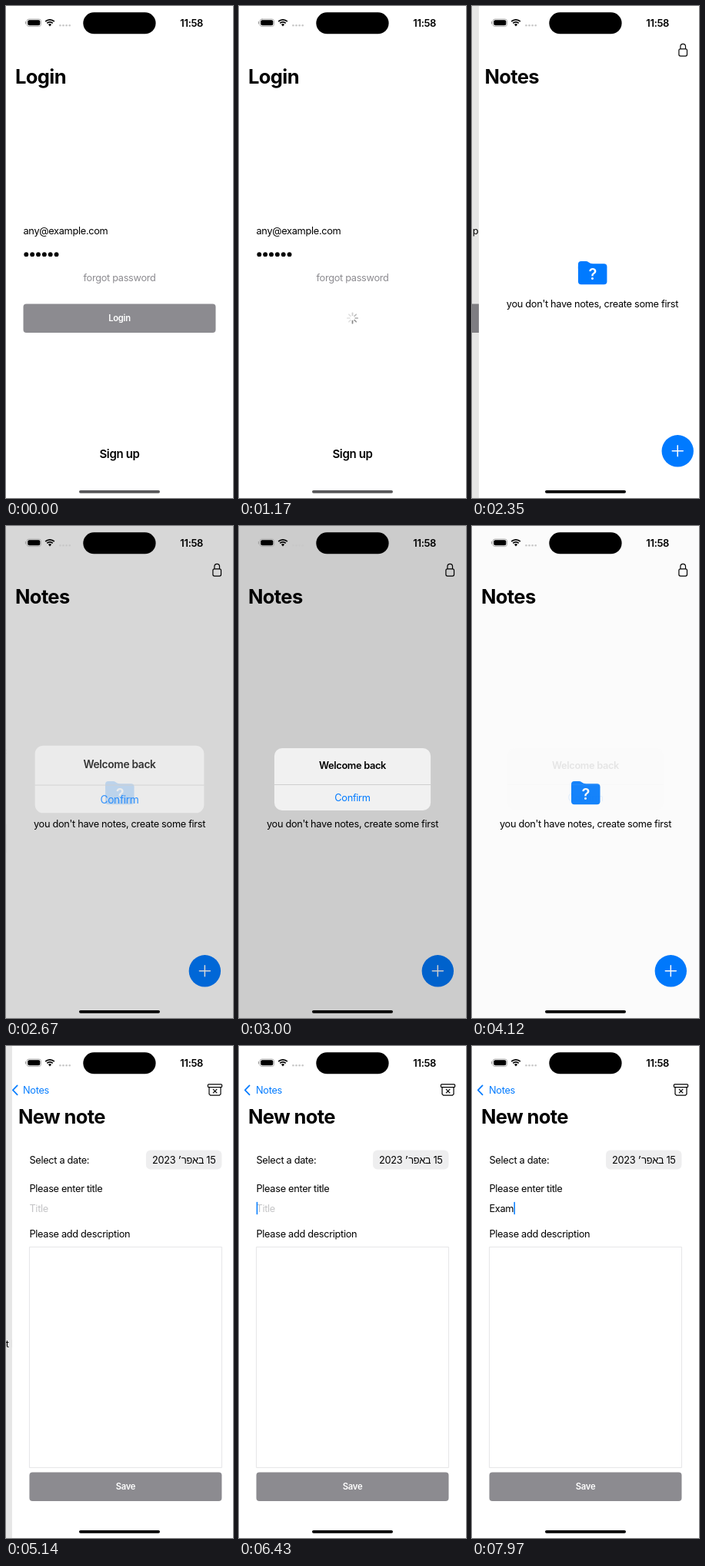
Recreate the animation shown at these times as an HTML page with a canvas. Size 295 px wide and 640 px high, loop 8 s.

```html
<!DOCTYPE html>
<html lang="en">
<head>
<meta charset="utf-8">
<title>Notes app</title>
<style>
html, body { margin: 0; width: 100%; height: 100%; overflow: hidden; background: #fff; }
canvas { display: block; width: 295px; height: 640px; }
</style>
</head>
<body>
<canvas id="stage"></canvas>
<script>
const W = 295, H = 640, LOOP = 8000, MID = 147.5;
const BLUE = '#007aff', GREY = '#8c8b90';
const BODY = 12.76, SMALL = 11.26, LARGE = 25.5;
const EMAIL = 'any@example.com';

// The screen only refreshes at these moments.
const TICKS = [0, 1170, 1280, 1420, 1570, 1670, 1770, 1870,
  2020, 2130, 2240, 2350, 2450, 2560, 2670, 2780, 2890, 3000,
  3760, 3900, 4010, 4120, 4220, 4330, 4690,
  4930, 5040, 5140, 5250, 5360,
  6320, 6430, 6670, 6790, 7330, 7640, 7840, 7970];

const canvas = document.getElementById('stage');
const ctx = canvas.getContext('2d');
const dpr = window.devicePixelRatio || 1;
canvas.width = W * dpr;
canvas.height = H * dpr;

// Critically damped spring: 1 at the start, settling to 0.
function spring(t, start, speed) {
  const u = Math.max(0, t - start) / 1000 * speed;
  return (1 + u) * Math.exp(-u);
}

function group(draw, { x = 0, alpha = 1 } = {}) {
  if (alpha <= 0.002) return;
  ctx.save();
  ctx.translate(x, 0);
  ctx.globalAlpha *= alpha;
  draw();
  ctx.restore();
}

function setFont(size, weight) {
  ctx.font = `${weight} ${size}px Inter, "Liberation Sans", sans-serif`;
  ctx.letterSpacing = `${-0.024 * size}px`;
}

function text(str, x, y, { size = BODY, weight = 400, color = '#000', align = 'left', dir = 'ltr' } = {}) {
  setFont(size, weight);
  ctx.direction = dir;
  ctx.textAlign = align;
  ctx.fillStyle = color;
  ctx.fillText(str, x, y);
}

function box(x, y, w, h, r, color) {
  ctx.fillStyle = color;
  ctx.beginPath();
  ctx.roundRect(x, y, w, h, r);
  ctx.fill();
}

function frame(x, y, w, h, r, color, width) {
  ctx.strokeStyle = color;
  ctx.lineWidth = width;
  ctx.beginPath();
  ctx.roundRect(x, y, w, h, r);
  ctx.stroke();
}

function disc(x, y, r, color) {
  ctx.fillStyle = color;
  ctx.beginPath();
  ctx.arc(x, y, r, 0, Math.PI * 2);
  ctx.fill();
}

function lines(color, width, ...paths) {
  ctx.strokeStyle = color;
  ctx.lineWidth = width;
  ctx.lineCap = ctx.lineJoin = 'round';
  ctx.beginPath();
  for (const [first, ...rest] of paths) {
    ctx.moveTo(...first);
    rest.forEach(p => ctx.lineTo(...p));
  }
  ctx.stroke();
}

function button(label, y) {
  box(22.5, y, 250, 37.5, 4, GREY);
  text(label, MID, y + 22.9, { size: SMALL, weight: 600, color: '#fff', align: 'center' });
}

function largeTitle(str) {
  text(str, 12, 100.5, { size: LARGE, weight: 700 });
}

function spinner(t) {
  const head = 4 + Math.floor((t - 1170) / 100);
  for (let i = 0; i < 8; i++) {
    const a = i * Math.PI / 4 - Math.PI / 2;
    const age = (((head - i) % 8) + 8) % 8;
    const c = Math.cos(a), s = Math.sin(a);
    const shade = 135 + Math.min(age, 5) * 18;
    lines(`rgb(${shade},${shade},${shade})`, 1.7,
      [[MID + c * 3.6, 406 + s * 3.6], [MID + c * 6.7, 406 + s * 6.7]]);
  }
}

function loginPage(t) {
  text(EMAIL, 22.5, 297.2);
  for (let i = 0; i < 6; i++) disc(26.3 + i * 7.85, 323.2, 2.9, '#000');
  text('forgot password', MID, 357.8, { color: GREY, align: 'center' });
  if (t >= 1170 && t < 2020) spinner(t);
  else button('Login', 387.5);
  text('Sign up', MID, 588.3, { size: 15, weight: 600, align: 'center' });
}

function folder() {
  ctx.fillStyle = BLUE;
  ctx.beginPath();
  ctx.roundRect(129, 335.3, 37.5, 27, 4);
  ctx.fill();
  ctx.beginPath();
  ctx.moveTo(129, 342);
  ctx.lineTo(129, 336);
  ctx.quadraticCurveTo(129, 332, 133, 332);
  ctx.lineTo(139, 332);
  ctx.quadraticCurveTo(141, 332, 142.5, 333.3);
  ctx.quadraticCurveTo(145, 335.3, 147.5, 335.3);
  ctx.lineTo(147.5, 342);
  ctx.fill();
  text('?', MID + 0.3, 355.8, { size: 20, weight: 600, color: '#fff', align: 'center' });
}

function notesPage(t) {
  folder();
  text("you don't have notes, create some first", MID, 391.8, { align: 'center' });
  const pressed = t >= 4690 && t < 4930;
  group(() => {
    disc(258.3, 578.8, 20.7, BLUE);
    lines('#fff', 1.5, [[251.3, 578.8], [265.3, 578.8]], [[258.3, 571.8], [258.3, 585.8]]);
  }, { alpha: pressed ? 0.7 : 1 });
}

function typedTitle(t) {
  return t >= 7970 ? 'Exam' : t >= 7840 ? 'Exa' : t >= 7640 ? 'Ex' : '';
}

function caretAlpha(t) {
  if (t < 6320) return 0;
  if (t < 6430) return 0.5;
  if (t < 6670) return 1;
  if (t < 6790) return 0.5;
  return t < 7330 ? 0 : 1;
}

function newNotePage(t) {
  text('Select a date:', 22.5, 152.5);
  box(174, 135.5, 98.5, 25, 6, '#eeeeef');
  text('15 באפר׳ 2023', 223.3, 152.5, { align: 'center', dir: 'rtl' });
  text('Please enter title', 22.5, 190.3);

  const typed = typedTitle(t);
  if (typed) text(typed, 22.5, 215.6);
  else text('Title', 22.5, 215.6, { color: '#c4c4c6' });
  setFont(BODY, 400);
  const caretX = 22.7 + ctx.measureText(typed).width;
  group(() => box(caretX, 202.8, 1.5, 16.4, 0.7, BLUE), { alpha: caretAlpha(t) });

  text('Please add description', 22.5, 248.8);
  frame(22.5, 261.5, 250, 287, 0, '#e6e6e8', 1);
  button('Save', 554.5);
}

function lockIcon() {
  frame(268.9, 55.8, 10.6, 9.3, 2, '#000', 1.2);
  ctx.beginPath();
  ctx.moveTo(270.9, 55.8);
  ctx.lineTo(270.9, 52.6);
  ctx.arc(274.2, 52.6, 3.3, Math.PI, 0);
  ctx.lineTo(277.5, 55.8);
  ctx.stroke();
}

function archiveIcon() {
  frame(262.4, 49.8, 18.2, 3.8, 1, '#000', 1.2);
  lines('#000', 1.2,
    [[264, 53.8], [264, 62.5], [265.6, 64.2], [277.4, 64.2], [279, 62.5], [279, 53.8]],
    [[269.3, 56.3], [273.9, 60.9]], [[273.9, 56.3], [269.3, 60.9]]);
}

function backButton(rest) {
  group(() => lines(BLUE, 1.7, [[13.6, 51.4], [7.8, 57.4], [13.6, 63.4]]), { x: rest * 40 });
  text('Notes', 22, 62, { color: BLUE });
}

function statusBar(t) {
  box(100.3, 8.3, 94.3, 28, 14, '#000');
  frame(27, 17, 18.6, 9.6, 3, '#a8a8a8', 0.9);
  box(28.3, 18.3, 16, 7, 2, '#000');
  box(24.9, 20, 1.2, 3.6, 0.6, '#a8a8a8');

  ctx.strokeStyle = '#000';
  ctx.lineCap = 'butt';
  ctx.lineWidth = 1.8;
  for (const r of [8.2, 5.2]) {
    ctx.beginPath();
    ctx.arc(57, 26, r, -Math.PI * 0.75, -Math.PI * 0.25);
    ctx.stroke();
  }
  ctx.fillStyle = '#000';
  ctx.beginPath();
  ctx.moveTo(57, 26.6);
  ctx.arc(57, 26, 2.9, -Math.PI * 0.75, -Math.PI * 0.25);
  ctx.fill();

  for (let i = 0; i < 4; i++) disc(70.4 + i * 4.1, 25.2, 1.3, '#c8c8c8');
  text('11:58', 241.2, 26.7, { size: 13, weight: 600, align: 'center' });
  box(95, 630, 105, 3.7, 1.85, t < 2130 ? '#58585a' : '#000');
}

function push(under, over, rest) {
  group(under, { x: -0.3 * W * (1 - rest) });
  ctx.fillStyle = `rgba(0,0,0,${0.1 * (1 - rest)})`;
  ctx.fillRect(0, 0, W, H);
  group(() => {
    ctx.fillStyle = '#fff';
    ctx.fillRect(0, 0, W, H);
    over();
  }, { x: W * rest });
}

function titles(from, to, rest) {
  group(() => largeTitle(from), { x: -60 * (1 - rest), alpha: rest * rest });
  group(() => largeTitle(to), { x: W * rest * 0.5, alpha: 1 - rest });
}

function alertBox(t) {
  if (t < 2560 || t > 4400) return;
  const closing = t >= 3900;
  const shown = closing ? spring(t, 3850, 15) : 1 - spring(t, 2540, 22);
  const scale = closing ? 1 : 1 + 0.2 * spring(t, 2560, 18);
  ctx.fillStyle = `rgba(0,0,0,${0.2 * shown})`;
  ctx.fillRect(0, 0, W, H);
  group(() => {
    ctx.translate(MID, 329.5);
    ctx.scale(scale, scale);
    ctx.translate(-MID, -329.5);
    box(46, 289, 203, 81, 10, '#f1f1f1');
    if (t >= 3760 && !closing) box(46, 337, 203, 33, [0, 0, 10, 10], '#dedede');
    ctx.fillStyle = '#cfcfcf';
    ctx.fillRect(46, 336, 203, 1);
    text('Welcome back', MID, 315.8, { weight: 600, align: 'center' });
    text('Confirm', MID, 358.3, { color: BLUE, align: 'center' });
  }, { alpha: shown });
}

function render(t) {
  ctx.setTransform(dpr, 0, 0, dpr, 0, 0);
  ctx.fillStyle = '#fff';
  ctx.fillRect(0, 0, W, H);

  const login = () => loginPage(t), notes = () => notesPage(t), note = () => newNotePage(t);
  if (t < 2130) {
    login();
    largeTitle('Login');
  } else if (t < 4930) {
    const rest = spring(t, 2048, 17.7);
    push(login, notes, rest);
    titles('Login', 'Notes', rest);
    group(lockIcon, { alpha: 1 - rest });
  } else {
    const rest = spring(t, 4830, 17.7);
    push(notes, note, rest);
    titles('Notes', 'New note', rest);
    group(lockIcon, { alpha: rest * rest });
    group(archiveIcon, { alpha: 1 - rest });
    group(() => backButton(rest), { alpha: 1 - rest });
  }
  alertBox(t);
  statusBar(t);
}

const origin = performance.now();
function loop() {
  const now = (performance.now() - origin) % LOOP;
  render(TICKS.findLast(tick => tick <= now));
  requestAnimationFrame(loop);
}
loop();
</script>
</body>
</html>
```
